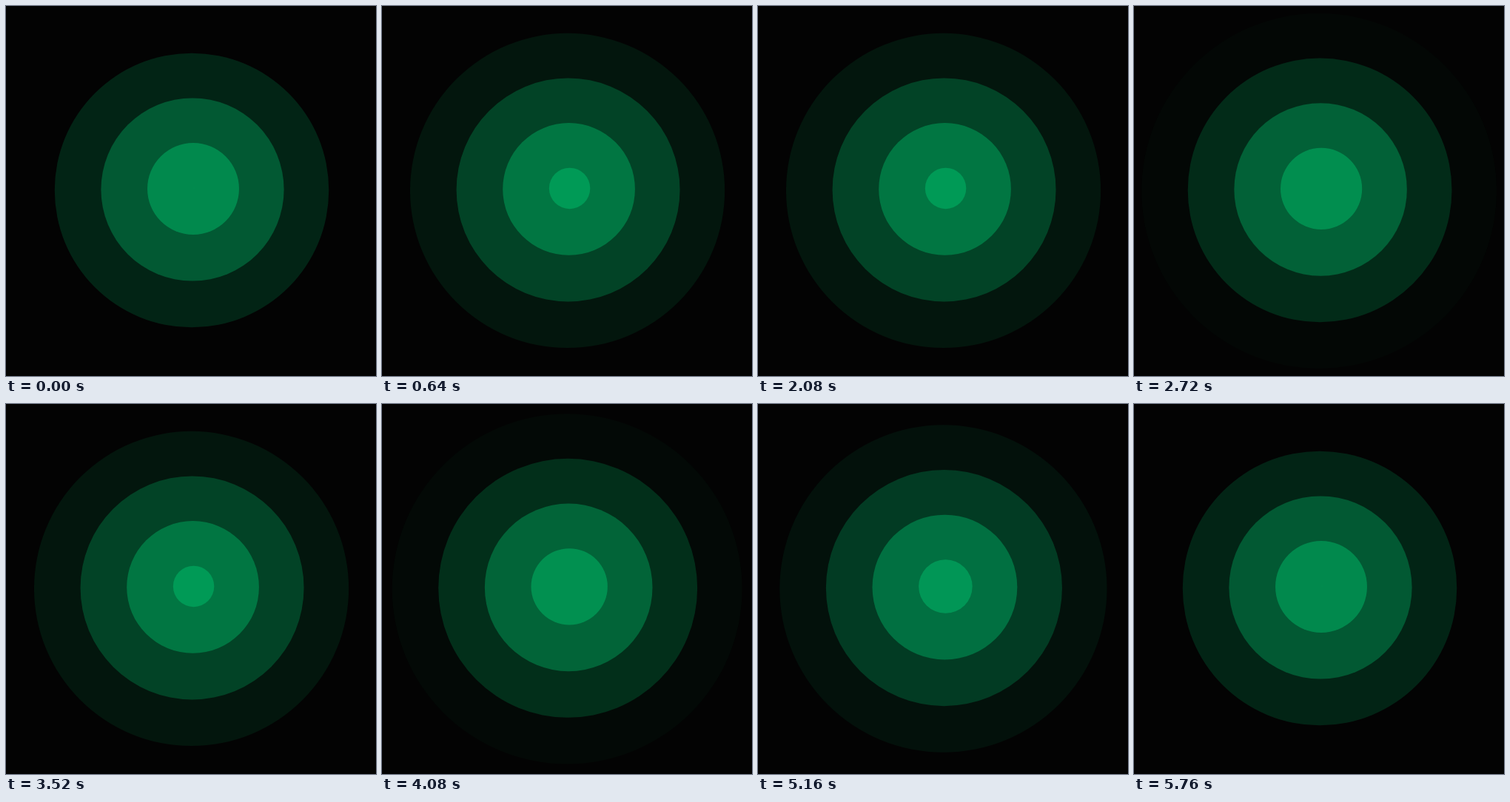
Write an HTML page that moves like this. It is 500x500 px and loops after 5800 ms.

```html
<!DOCTYPE html>
<html lang="en">
<head>
<meta charset="utf-8">
<title>Ripple</title>
<style>
  html, body { margin: 0; width: 100%; height: 100%; overflow: hidden; background: #030303; }
  svg { display: block; width: 100%; height: 100%; }
</style>
</head>
<body>
<svg viewBox="0 0 500 500" fill="#00a85f">
  <circle/><circle/><circle/><circle/>
</svg>
<script>
  const LOOP = 5800, STEP = 40, BEAT = 1440;
  const circles = [...document.querySelectorAll('circle')];
  const count = circles.length;
  const start = performance.now();

  // age runs from 0 (birth) to count (faded out), one unit per beat
  function place(circle, age) {
    circle.setAttribute('r', 0.3 + 61.65 * age);
    circle.setAttribute('cx', 254 - age);
    circle.setAttribute('cy', 246 + age);
    circle.setAttribute('fill-opacity', 0.8 * (1 - age / count));
  }

  function draw(now) {
    const t = Math.max(0, now - start) % LOOP;
    // small lead keeps the 40 ms ticks from landing late
    const tick = Math.floor((t + 3) / STEP) * STEP % LOOP;
    const phase = tick % BEAT / BEAT;
    circles.forEach((circle, i) => place(circle, i + phase));
    requestAnimationFrame(draw);
  }

  draw(start);
</script>
</body>
</html>
```
